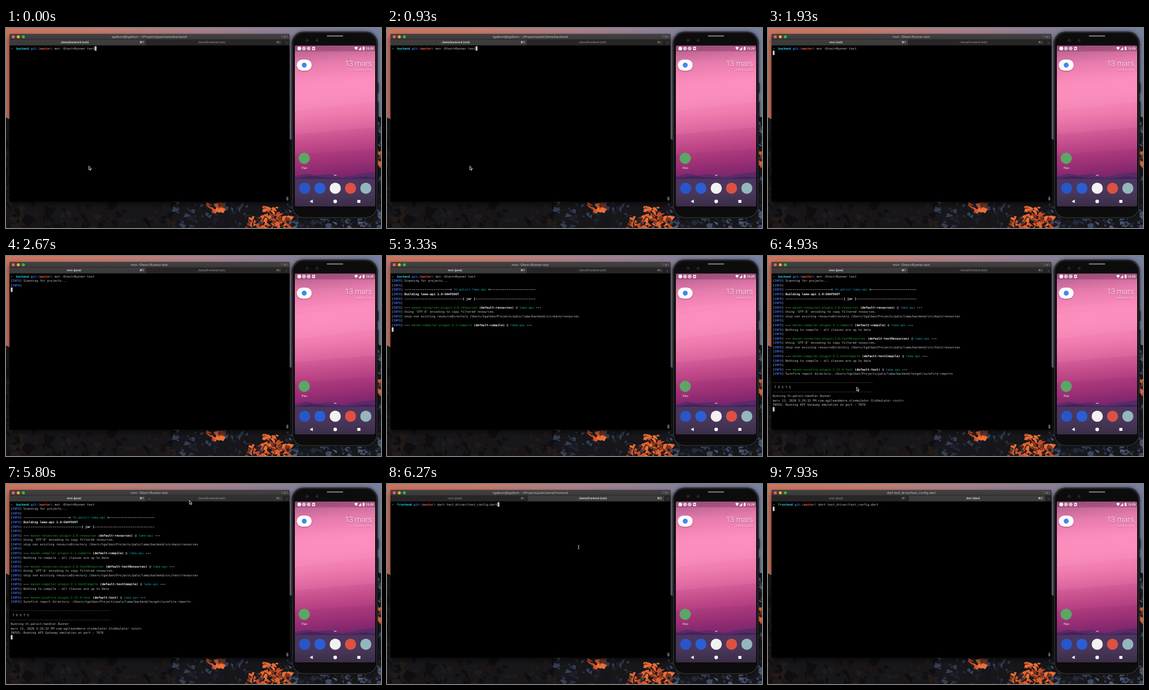
An HTML page with a canvas that plays this animation: 640x342 px, repeating every 8 s.

```html
<!DOCTYPE html>
<html lang="fr">
<head>
<meta charset="utf-8">
<title>Terminal and phone</title>
<style>
html, body { margin: 0; width: 100%; height: 100%; overflow: hidden; background: #17161a; }
canvas { display: block; width: 100vw; height: 100vh; }
</style>
</head>
<body>
<canvas id="stage"></canvas>
<script>
const W = 640, H = 342, LOOP = 8000;
const CELL = 3.113, ROW = 7.57, LEFT = 8, TOP = 35;
const MONO = "'DejaVu Sans Mono', monospace";
const UI = "Inter, 'DejaVu Sans', sans-serif";
const PHONE = "Roboto, sans-serif";
const USER = "tgalbon";
const HOME = "/Users/" + USER + "/Projects/palo/lama/backend/";

// Text styles, switched inside a line with ^ and a letter.
const STYLES = {
  w: ["#c6c6c6", ""], b: ["#f4f4f4", "bold "], i: ["#4470ea", "bold "],
  g: ["#22a62d", ""], c: ["#1c9fb3", ""], C: ["#27d3e2", "bold "],
  r: ["#ef5a41", "bold "], a: ["#3f9d62", ""]
};

const info = s => "^w[^iINFO^w] " + s;
const prompt = (dir, cmd) => `^a➜  ^C${dir} ^igit:(^rmaster^i)^w ${cmd}`;
const plugin = (name, goal) =>
  info(`^b--- ^gmaven-${name}:${goal} ^b(default-${goal.split(":")[1]})^w @ ^clama-api^b ---`);
const dash = n => "-".repeat(n);
const copying = info("Using 'UTF-8' encoding to copy filtered resources.");
const skipping = kind => info(`skip non existing resourceDirectory ${HOME}src/${kind}/resources`);
const nothing = info("Nothing to compile - all classes are up to date");
const gap = info("");

const MVN = "mvn -Dtest=Runner test";
const DART = "dart test_driver/test_config.dart";

const buildLog = [
  prompt("backend", MVN),
  info("Scanning for projects..."),
  gap,
  info(`^b${dash(25)}< ^cth.paloit:lama-api^b >${dash(25)}`),
  info("^bBuilding lama-api 1.0-SNAPSHOT"),
  info(`^b${dash(32)}[ jar ]${dash(33)}`),
  gap,
  plugin("resources-plugin", "2.6:resources"), copying, skipping("main"),
  gap,
  plugin("compiler-plugin", "3.1:compile"), nothing,
  gap,
  plugin("resources-plugin", "2.6:testResources"), copying, skipping("test"),
  gap,
  plugin("compiler-plugin", "3.1:testCompile"), nothing,
  gap,
  plugin("surefire-plugin", "2.12.4:test"),
  info(`Surefire report directory: ${HOME}target/surefire-reports`),
  "",
  "^w" + dash(55),
  "^w T E S T S",
  "^w" + dash(55),
  "^wRunning th.paloit.handler.Runner",
  "^wmars 13, 2020 3:29:32 PM com.agileandmore.slsemulator.SlsEmulator <init>",
  "^wINFOS: Running API Gateway emulation on port : 7070"
];
const dartLog = [prompt("frontend", DART)];

// Time, number of finished lines.
const BUILD_STEPS = [[1270, 1], [2600, 3], [3000, 7], [3300, 12], [3600, 17], [3720, 20], [3930, 23], [4000, 28], [4530, 30]];
const ENTER = 1270, JAVA = 2000, SWITCH = 6000, DART_ENTER = 6930, DART_RUN = 7670;

const canvas = document.getElementById("stage");
let ctx = canvas.getContext("2d");

function rect(x, y, w, h, fill) {
  ctx.fillStyle = fill;
  ctx.fillRect(x, y, w, h);
}
function round(x, y, w, h, r, fill) {
  ctx.beginPath();
  ctx.roundRect(x, y, w, h, r);
  ctx.fillStyle = fill;
  ctx.fill();
}
function disc(x, y, r, fill) {
  ctx.beginPath();
  ctx.arc(x, y, r, 0, 7);
  ctx.fillStyle = fill;
  ctx.fill();
}
function poly(fill, ...p) {
  ctx.beginPath();
  for (let i = 0; i < p.length; i += 2) ctx.lineTo(p[i], p[i + 1]);
  ctx.closePath();
  ctx.fillStyle = fill;
  ctx.fill();
}
function ramp(x0, y0, x1, y1, ...colors) {
  const g = ctx.createLinearGradient(x0, y0, x1, y1);
  colors.forEach((c, i) => g.addColorStop(i / (colors.length - 1), c));
  return g;
}
function label(s, x, y, font, fill, align = "center") {
  ctx.font = font;
  ctx.fillStyle = fill;
  ctx.textAlign = align;
  ctx.textBaseline = "middle";
  ctx.textRendering = "geometricPrecision";
  ctx.fillText(s, x, y);
}

function randomizer(seed) {
  return () => (seed = (seed * 16807) % 2147483647) / 2147483647;
}

function rocks(n, x, y, w, h, size, colors, seed) {
  const rnd = randomizer(seed);
  for (let i = 0; i < n; i++) {
    const px = x + rnd() * w, py = y + rnd() * h, s = size * (0.4 + rnd());
    poly(colors[Math.floor(rnd() * colors.length)],
      px, py, px + s * (0.3 + rnd()), py + s * (rnd() - 0.2),
      px + s * rnd(), py + s * (0.6 + rnd()), px - s * 0.5 * rnd(), py + s * rnd());
  }
}

function wallpaper() {
  const brown = ["#120f10", "#1a1514", "#221b19", "#0f0d0f"];
  const slate = ["#14151a", "#1d212c", "#333e55", "#191719"];
  const steel = ["#1a1c24", "#3b4863", "#4d5973", "#232a39"];
  const ember = ["#e0602c", "#ee7138", "#c54e25", "#7c3520", "#2a2226"];

  rect(0, 0, W, H, ramp(0, 0, W, 0, "#c8745f", "#c37a6c", "#a98088", "#8a8098", "#76809f"));
  poly("#17161a", 0, 153, 8, 157, 484, 190, 490, 192, 632, 150, W, 153, W, H, 0, H);
  rocks(26, -4, 160, 9, 140, 8, brown, 11);
  rocks(30, 632, 155, 8, 165, 7, steel, 23);
  rocks(18, 634, 204, 7, 40, 6, ember, 41);
  rocks(110, 0, 292, 290, 50, 11, brown, 5);
  rocks(150, 285, 292, 150, 50, 6, slate, 9);
  rocks(130, 478, 300, 162, 42, 6, steel, 17);
  rocks(26, 342, 297, 28, 15, 6, ember, 31);
  rocks(34, 408, 318, 34, 24, 6, ember, 37);
  rocks(50, 438, 302, 26, 40, 7, ember, 43);
  rocks(30, 462, 316, 22, 26, 7, ember, 53);
}

function windowFrame() {
  ctx.save();
  ctx.shadowColor = "rgba(0,0,0,.6)";
  ctx.shadowBlur = 10;
  ctx.shadowOffsetY = 4;
  round(6, 10, 478, 287, [3, 3, 1, 1], "#000");
  ctx.restore();
  round(6, 10, 478, 10, [3, 3, 0, 0], ramp(0, 10, 0, 20, "#444243", "#393738"));
  ["#fc5b57", "#e6b129", "#35b645"].forEach((c, i) => disc(12.4 + i * 8.6, 15, 2.6, c));
  label("⌥⌘1", 481, 15, "5.2px " + UI, "#8b8989", "right");
  round(478.5, 288.5, 3.5, 6.5, 1, "#5c5c5c");
}

function phone() {
  ctx.save();
  ctx.shadowColor = "rgba(0,0,0,.6)";
  ctx.shadowBlur = 6;
  round(633, 94, 2.6, 17, 0.8, "#1b1b1c");
  round(633, 126, 2.6, 32, 0.8, "#1b1b1c");
  round(487.6, 6.3, 146.8, 319.4, 20, "#161617");
  ctx.restore();
  round(488.8, 7.5, 144.4, 317, 19, "#434244");
  round(489.6, 8.3, 142.8, 315.4, 18.2, "#0c0c0d");
  round(547.5, 12.4, 28, 2.4, 1.2, "#747375");
  [514, 531].forEach(x => disc(x, 21, 2.6, "#242429"));

  ctx.save();
  ctx.beginPath();
  ctx.roundRect(493, 30, 137, 274.5, 2);
  ctx.clip();
  rect(493, 30, 138, 275, ramp(552, 30, 572, 258,
    "#b5608e", "#e67bad", "#fa8bba", "#f989b8", "#f07daf", "#dc669f", "#c04b8a", "#a2367a", "#75286d"));
  poly("rgba(255,170,205,.12)", 493, 100, 631, 84, 631, 126, 493, 142);
  poly("rgba(140,20,95,.08)", 493, 182, 631, 170, 631, 262, 493, 262);
  poly("rgba(120,20,95,.10)", 493, 216, 631, 206, 631, 262, 493, 262);
  poly("#5b2a68", 493, 254, 512, 249, 530, 252, 552, 250, 575, 255, 600, 250, 631, 246, 631, 305, 493, 305);
  poly("#42235a", 493, 257, 520, 253, 550, 256, 585, 257, 612, 254, 631, 255, 631, 305, 493, 305);
  rect(493, 258, 138, 47, ramp(0, 258, 0, 305, "#4c3560", "#49375a", "#3b2d48"));
  rect(493, 30, 138, 10, "rgba(70,10,50,.22)");
  ctx.restore();

  const white = "#fff";
  disc(500.5, 35, 3.2, white);
  [508.5, 516.5].forEach(x => {
    disc(x, 35, 3, white);
    disc(x, 35, 2.1, "#a95c87");
    disc(x, 35, 1.2, white);
  });
  round(522.5, 32.3, 4.8, 5.4, 0.8, white);
  rect(523.7, 34, 2.4, 2, "#a95c87");
  poly(white, 594.3, 33.4, 597.5, 32, 600.7, 33.4, 597.5, 37.8);
  poly(white, 606.2, 32.2, 606.2, 37.8, 601.4, 37.8);
  round(608.8, 32.2, 3, 5.6, 0.5, white);
  label("15:29", 627.5, 35.2, "500 5.5px " + PHONE, white, "right");

  ctx.save();
  ctx.shadowColor = "rgba(60,0,40,.45)";
  ctx.shadowBlur = 2;
  ctx.shadowOffsetY = 0.7;
  label("13 mars", 624.5, 61.7, "300 12.8px " + PHONE, white, "right");
  label("VENDREDI, 2020", 624.5, 71.8, "4.1px " + PHONE, "rgba(255,255,255,.6)", "right");
  round(496.2, 54, 25.6, 19, 9.5, "#fcfbfb");
  ctx.restore();
  disc(509, 63.5, 4.2, "#4585ee");

  disc(509, 222.8, 9.6, "#5aa765");
  label("Plan", 509.3, 239.3, "4.8px " + PHONE, white);

  ctx.strokeStyle = white;
  ctx.lineWidth = 1;
  ctx.beginPath();
  ctx.moveTo(559.8, 253);
  ctx.lineTo(561.8, 251);
  ctx.lineTo(563.8, 253);
  ctx.stroke();

  ["#2856c9", "#2b5ed4", "#f4f1f1", "#dd5144", "#94b7be"].forEach((c, i) => disc(509.7 + i * 26.1, 274, 9.5, c));
  poly(white, 518.3, 296.5, 523.5, 293.4, 523.5, 299.6);
  disc(561.8, 296.5, 3.1, white);
  round(599.6, 293.9, 5.2, 5.2, 0.5, white);
}

function tab(x, w, s, key, on, hover) {
  rect(x, 20, w, 9.6, on ? "#3d3b3c" : hover ? "#323031" : "#272526");
  const fill = on ? "#f0f0f0" : "#a6a4a4", weight = on ? "600 " : "";
  label(s, x + w / 2 - 6.5, 25, weight + "4.75px " + UI, fill);
  label(key, x + w - 4.5, 25, weight + "4.8px " + UI, fill, "right");
  if (hover) label("×", x + 5, 25, "5.5px " + UI, "#999");
}

function tabs(t, second) {
  const first = t < ENTER ? "../lama/backend (zsh)" : t < JAVA ? "mvn (zsh)" : "mvn (java)";
  const other = t < DART_ENTER ? "../lama/frontend (zsh)" : t < DART_RUN ? "dart (zsh)" : "dart (dart)";
  rect(6, 19.6, 478, 10.4, "#191819");
  tab(6, 233.3, first, "⌘1", !second);
  tab(239.8, 233.5, other, "⌘2", second, !second && t > 5650);
  rect(473.8, 20, 10.2, 9.6, "#272526");
  label("+", 478.7, 24.8, "6px " + UI, "#6b696a");
  const path = dir => `${USER}@${USER}: ~/Projects/palo/lama/${dir}`;
  const title = second
    ? (t < DART_ENTER ? path("frontend") : DART)
    : (t < ENTER ? path("backend") : MVN);
  label(title, 244.5, 14.9, "5.6px " + UI, "#c2c0c0");
}

function line(s, row) {
  let col = 0;
  const parts = s.split(/\^(\w)/);
  for (let i = 1; i < parts.length; i += 2) {
    const [fill, weight] = STYLES[parts[i]], text = parts[i + 1];
    label(text, LEFT + col * CELL, TOP + 0.4 + row * ROW, `${weight}5.17px ${MONO}`, fill, "left");
    col += text.length;
  }
  return col;
}

function terminal(t, second) {
  const log = second ? dartLog : buildLog;
  let done = 0;
  if (second) done = t < DART_ENTER ? 0 : 1;
  else for (const [at, n] of BUILD_STEPS) if (t >= at) done = n;
  let end = 0;
  log.slice(0, Math.max(done, 1)).forEach((s, i) => end = line(s, i));
  rect(LEFT + (done ? 0 : end * CELL), TOP - 3.8 + done * ROW, 3.3, 7.5, "#c3c3c3");
}

function arrow(x, y) {
  ctx.beginPath();
  [[0, 0], [0, 6.6], [1.5, 5.2], [2.6, 7.6], [3.6, 7.1], [2.6, 4.8], [4.7, 4.7]]
    .forEach(([dx, dy]) => ctx.lineTo(x + dx, y + dy));
  ctx.closePath();
  ctx.fillStyle = "#111";
  ctx.fill();
  ctx.strokeStyle = "#eee";
  ctx.lineWidth = 0.8;
  ctx.stroke();
}

function beam(x, y) {
  ctx.strokeStyle = "#aaa";
  ctx.lineWidth = 0.8;
  ctx.beginPath();
  for (const side of [-1.5, 1.5]) {
    ctx.moveTo(x + side, y - 3.2);
    ctx.quadraticCurveTo(x, y - 3.2, x, y - 2);
    ctx.lineTo(x, y + 2);
    ctx.quadraticCurveTo(x, y + 3.2, x + side, y + 3.2);
  }
  ctx.stroke();
}

function ease(t, from, to) {
  const k = Math.min(1, Math.max(0, (t - from) / (to - from)));
  return k * k * (3 - 2 * k);
}

function pointer(t) {
  if (t < ENTER + 30) return arrow(141.3, 236);
  if (t < 4800 || t >= DART_ENTER) return;
  const a = ease(t, 4800, 5700), b = ease(t, SWITCH, 6260);
  const x = 141.3 + 171.7 * a + 14 * b, y = 236 - 208 * a + 80 * b;
  if (y > 32 && t > SWITCH) beam(x, y);
  else arrow(x, y);
}

let backdrop, scale = 0;
function resize() {
  scale = Math.max(innerWidth / W, innerHeight / H) * (devicePixelRatio || 1);
  canvas.width = Math.round(W * scale);
  canvas.height = Math.round(H * scale);
  backdrop = document.createElement("canvas");
  backdrop.width = canvas.width;
  backdrop.height = canvas.height;
  const main = ctx;
  ctx = backdrop.getContext("2d");
  ctx.scale(scale, scale);
  wallpaper();
  windowFrame();
  phone();
  ctx = main;
}

function draw() {
  const t = performance.now() % LOOP, second = t >= SWITCH;
  ctx.setTransform(1, 0, 0, 1, 0, 0);
  ctx.drawImage(backdrop, 0, 0);
  ctx.setTransform(scale, 0, 0, scale, 0, 0);
  tabs(t, second);
  terminal(t, second);
  pointer(t);
  requestAnimationFrame(draw);
}

addEventListener("resize", resize);
resize();
draw();
</script>
</body>
</html>
```
